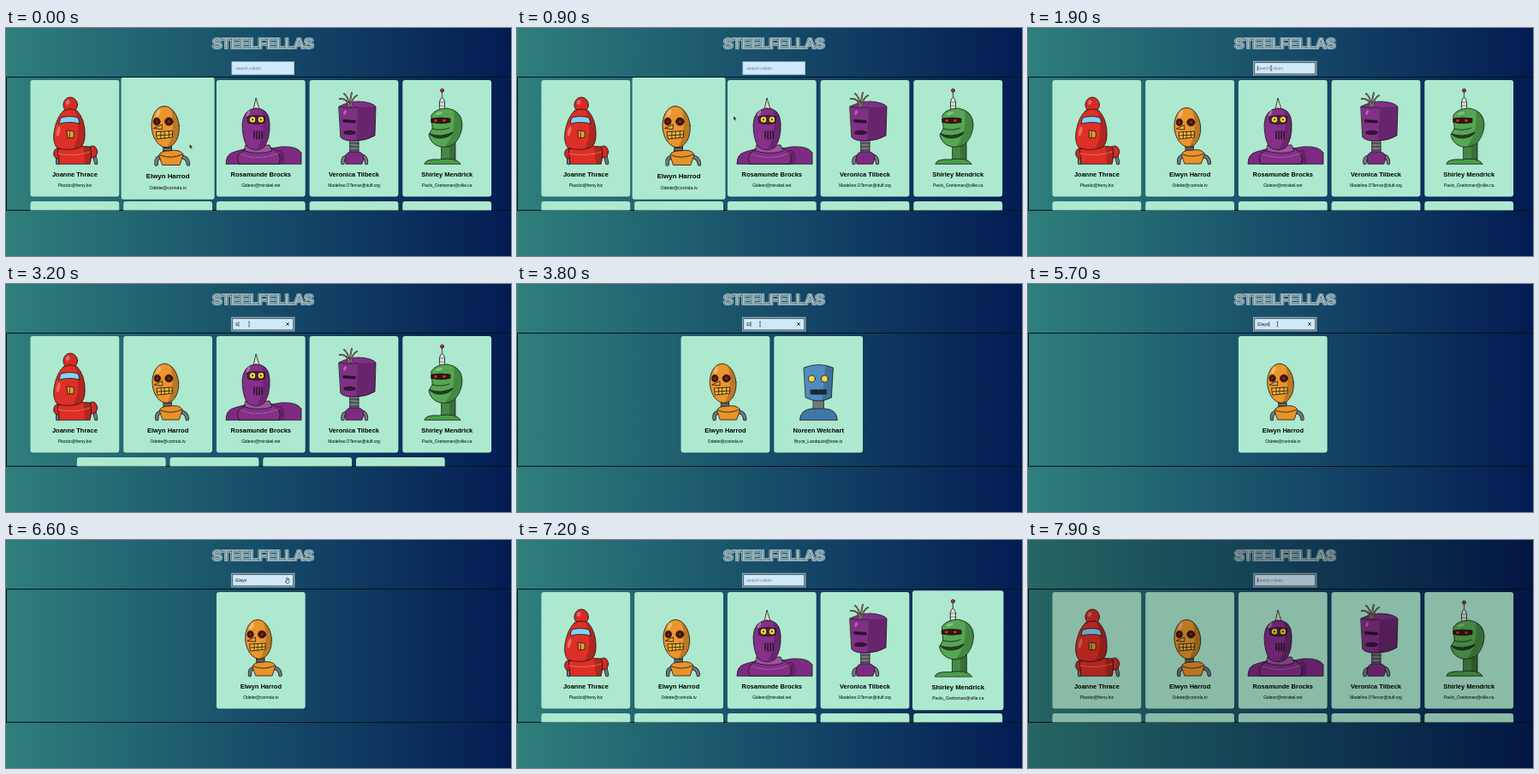
An HTML page for the animation above (8 s loop, 590x267 px).

```html
<!DOCTYPE html>
<html lang="en">
<head>
<meta charset="utf-8">
<title>Robot search</title>
<style>
html, body { margin: 0; width: 100%; height: 100%; overflow: hidden; background: #1a4d67; }
svg { display: block; width: 100vw; height: 100vh; font-family: "Liberation Sans", Arial, sans-serif; }
.name { font-size: 7.5px; font-weight: bold; text-anchor: middle; }
.mail { font-size: 4.95px; text-anchor: middle; }
.title { font-size: 17.4px; font-weight: bold; letter-spacing: -.5px; text-anchor: middle; fill: #b4c6c8; stroke-linejoin: round; }
#query { font-size: 4.9px; }
.art { stroke: #1c1518; stroke-width: .8; stroke-linejoin: round; stroke-linecap: round; }
</style>
</head>
<body>
<svg viewBox="0 0 590 267" preserveAspectRatio="none">
  <defs>
    <linearGradient id="bg">
      <stop offset="0" stop-color="#2f7f7c"/>
      <stop offset=".5" stop-color="#174d69"/>
      <stop offset="1" stop-color="#031c53"/>
    </linearGradient>
    <clipPath id="clip"><rect x="0" y="58" width="590" height="155.5"/></clipPath>
  </defs>
  <rect width="590" height="267" fill="url(#bg)"/>
  <text class="title" x="300" y="24" stroke="#b4c6c8" stroke-width="2.2">STEELFELLAS</text>
  <text class="title" x="300" y="24" stroke="#2b5c70" stroke-width=".6">STEELFELLAS</text>

  <rect x="263.9" y="39.6" width="72.6" height="15" fill="#cfe9fa" stroke="#a9bfc9" stroke-width=".8"/>
  <g id="focus" fill="none">
    <rect x="263.7" y="39.4" width="73" height="15.4" stroke="#98a8ac" stroke-width="1.5"/>
    <rect x="264.7" y="40.4" width="71" height="13.4" stroke="#2b4854" stroke-width=".8"/>
  </g>
  <text id="query" x="268.3" y="48.7"></text>
  <path id="caret" d="M0 44v6" stroke="#111" stroke-width=".6"/>
  <path id="clear" d="M327.3 45.3l3.4 3.4m0-3.4l-3.4 3.4" stroke="#1b3a55" stroke-width="1"/>

  <path d="M590 57.5H.5V213.5H590" fill="none" stroke="#04141c"/>
  <g id="cards" clip-path="url(#clip)"></g>

  <g id="pointer">
    <path id="arrow" d="M0 0V5.2L1.3 4.1 2.2 6 3.1 5.6 2.2 3.8H3.8Z" fill="#111" stroke="#dfeee8" stroke-width=".4"/>
    <path id="beam" d="M-1-2.8H1M0-2.8V2.8M-1 2.8H1" stroke="#222" stroke-width=".6"/>
    <path id="hand" d="M-.5-2.5q.6-.6 1.1 0V-.3L2.4.1V2.2L1.6 3.6H-1L-2.2 1.2-.5 1.6Z" fill="#fff" stroke="#111" stroke-width=".6"/>
  </g>
  <rect id="shade" width="590" height="267" fill="#000"/>
</svg>
<script>
const $ = id => document.getElementById(id);
const LOOP = 8000, PITCH = 108.7, MID = 297.8, CENTER_Y = 129.2, ROW = 142;

const path = (d, fill = 'none', more = '') => `<path d="${d}" fill="${fill}" ${more}/>`;
const oval = (x, y, rx, ry, fill, more = '') =>
  `<ellipse cx="${x}" cy="${y}" rx="${rx}" ry="${ry}" fill="${fill}" ${more}/>`;
const flat = 'stroke="none"';
const shine = (x, y, rx, ry, tilt) =>
  oval(x, y, rx, ry, '#fff', `${flat} opacity=".3" transform="rotate(${tilt} ${x} ${y})"`);
const shadow = d => path(d, '#000', `${flat} opacity=".2"`);
const arm = d => path(d, 'none', 'stroke-width="4.4"') + path(d, 'none', 'stroke="#72797e" stroke-width="3"');

const red = [
  arm('M60 149V158M103 149L105 158'),
  oval(60, 147, 4.5, 6, '#cf2c24'), oval(101, 145, 5.5, 7, '#cf2c24'),
  path('M62 159L60 142Q78 137 98 139Q101 148 98 159Z', '#dd2f26'),
  oval(75, 90, 8.3, 9, '#d42d25'),
  path('M67 97Q76 93 83 97Q92 107 92 124Q92 137 86 140Q72 145 59 140Q54 133 56 121Q59 104 67 97Z', '#df3028'),
  shadow('M80 95Q92 107 92 124Q92 137 86 140L78 142Q89 123 80 95Z'),
  shadow('M90 139L98 139Q101 148 98 159H92Z'),
  path('M64 105Q74 102 84 105L86 112Q74 109 62 112Z', '#7fd3f3'),
  path('M71 120L79 121V128L72 129Z', '#e8a02e'),
  path('M74 122V128'),
  path('M61 147Q79 151 98 145', 'none', 'stroke="#f2b5ac" stroke-dasharray="1 2"'),
  shine(72, 87, 2, 3, 20), shine(61, 121, 1.8, 6, 14)
].join('');

const orange = [
  path('M293 136H302V149H293Z', '#6f777b'),
  path('M293 140H302M293 143H302'),
  arm('M290 150Q284 151 285 158M314 150Q320 151 320.5 158'),
  path('M288 148Q289 143 300 143Q311 141 315 147L311 159H292Z', '#e8922a'),
  path('M289 148Q302 153 314 147'),
  oval(295, 116.3, 15.3, 23, '#ea962c', 'transform="rotate(-5 295 116)"'),
  shadow('M301 95Q311 105 310 121Q308 136 297 139Q307 122 301 95Z'),
  oval(285.5, 110.5, 3.6, 4, '#43150f'), oval(299, 110.5, 4.5, 4.3, '#43150f'),
  oval(285.5, 110.5, 1.2, 1.2, '#a02820', flat), oval(299, 110.5, 1.4, 1.4, '#a02820', flat),
  path('M291 114L282 118L291 119Z', '#f5a843'),
  path('M285 122L303 121V128L286 130Z', '#f0b83a'),
  path('M286 126L303 125M290 122V129M294 122V129M299 121V128'),
  shine(287, 101, 2, 4.5, 25)
].join('');

const violet = [
  path('M257 159Q257 147 267 145L281 141H310L322 139Q340 138 345 146V159Z', '#7d2b82'),
  path('M272 159Q266 147 281 142L309 140Q324 146 319 159Z', '#843089'),
  shadow('M319 159Q322 148 316 143L322 142Q327 150 325 159Z'),
  path('M275 148Q297 156 319 146', 'none', 'stroke="#c98acb" stroke-dasharray="1 2"'),
  path('M280 137H308L311 144Q296 149 279 144Z', '#9d52a1'),
  path('M289 95L292 82L296 95Z', '#d5dadb'),
  path('M292 94Q307 94 308 111Q309 130 301 140Q291 146 282 139Q276 130 276 113Q277 95 292 94Z', '#85308a'),
  shadow('M299 95Q308 101 308 114Q308 132 300 140L293 142Q304 122 299 95Z'),
  path('M282 104Q292 101 303 104L302 111Q292 114 283 111Z', '#4a1c50'),
  oval(288, 107.3, 3.8, 3.8, '#f4d531'), oval(297.8, 107.3, 3.8, 3.8, '#f4d531'),
  oval(288, 107.3, 1, 1, '#111', flat), oval(297.8, 107.3, 1, 1, '#111', flat),
  path('M290 121V129M293 121V130M296 121V130M299 121V129', 'none', 'stroke-width="1.4"'),
  shine(283, 100, 1.5, 4, 28)
].join('');

const strands = 'M401 92Q398 82 390 83M401 92Q400 80 395 77M402 92Q402 82 404 76M403 92Q404 82 410 79';
const box = [
  path('M402 128H412V148H402Z', '#747a80'),
  path('M402 135H412M402 139H412M402 143H412'),
  arm('M397 151Q393 152 393.5 158M417 150Q421 152 421 158'),
  path('M397 159Q394 147 402 145H412Q421 147 416 159Z', '#7d2b82'),
  path('M389 92Q400 86 413 86Q428 87 432 92L431 126Q421 132 409 132Q395 133 391 128Z', '#803086'),
  shadow('M411 93L432 92L431 126Q421 132 409 132Z'),
  path('M389 92Q400 95 411 93', 'none', 'stroke-width=".6"'),
  path(strands, 'none', 'stroke-width="1.9"'),
  path(strands, 'none', 'stroke="#a88f88" stroke-width=".9"'),
  path('M394 107.5L408 108.5V111L394 110Z', '#2b0d2d'),
  oval(401.5, 122.5, 7, 2.2, '#3b123d'),
  shine(396, 99, 1.5, 3, 25)
].join('');

const green = [
  path('M509.5 74V96', 'none', 'stroke="#555" stroke-width="1.2"'),
  oval(509.5, 73.2, 2, 2, '#c92c3b'),
  path('M507 96Q505 84 509.5 81Q514 84 512 96Z', '#dfe5df'),
  path('M506 87H513M506 91H513', 'none', 'stroke-width=".5"'),
  path('M509 132H525V155H509Z', '#458a44'),
  shadow('M518 132H525V155H518Z'),
  path('M489 159Q490 153 506 154Q526 151 531 159Z', '#4aa04a'),
  path('M497 102Q502 94 516 94Q532 97 533 112Q533 124 526 133Q519 141 507 139Q496 136 494 125L498 118Z', '#55a752'),
  shadow('M523 96Q533 101 533 114Q531 130 518 139L513 139Q526 122 523 96Z'),
  path('M497 106Q508 104 519 106V110.5Q508 113 497 110.5Z', '#351512'),
  oval(502, 108.4, 1.8, 1.4, '#d33a26', flat), oval(512, 108.4, 1.8, 1.4, '#d33a26', flat),
  path('M498 118Q508 121 518 117'),
  path('M495 124Q508 129 522 122Q519 128 508 129Q499 129 495 124Z', '#26421f'),
  shine(506, 100, 4, 1.6, -14)
].join('');

const blue = [
  path('M292 134H304V150H292Z', '#71787c'),
  path('M276 159Q277 147 290 146H306Q319 147 320 159Z', '#3f78a8'),
  path('M281 98Q298 91 315 98L313 133Q298 141 283 133Z', '#4f8dc0'),
  shadow('M306 95L315 98L313 133L302 137Z'),
  oval(290, 111, 4, 4, '#f0d64b'), oval(305, 111, 4, 4, '#f0d64b'),
  path('M289 124H307V129H289ZM295 124V129M301 124V129', '#1d2b3a')
].join('');

const people = [
  ['Joanne Thrace', 'Placido@ferny.biz', red, 80.2],
  ['Elwyn Harrod', 'Odette@corinda.tv', orange, MID],
  ['Rosamunde Brocks', 'Gideon@mirabel.net', violet, MID],
  ['Veronica Tilbeck', 'Madeline.OTerran@dulf.org', box, 406.5],
  ['Shirley Mendrick', 'Pavlo_Grettsman@ollie.ca', green, 515.2],
  ['Mrs. Denise Strand', '', '', 0],
  ['Rufus Weimark', '', '', 0],
  ['Ambrosius Hjalmar V', '', '', 0],
  ['Noreen Welchart', 'Bryce_Landquist@tove.io', blue, MID],
  ['Emmentina DuRoche', '', '', 0]
];

$('cards').innerHTML = people.map(([name, mail, art, x]) => `<g>
  <rect x="-51.2" y="61.8" width="103.8" height="136.6" rx="3" opacity=".15"/>
  <rect x="-51.9" y="61" width="103.8" height="136.4" rx="3" fill="#ace9cf"/>
  <g class="art" transform="translate(${-x} 0)">${art}</g>
  <text class="name" y="174">${name}</text>
  <text class="mail" y="186">${mail}</text></g>`).join('');
const cards = [...$('cards').children];

// [time, text] and [card, enter, leave]
const typing = [[0, ''], [3100, 'E'], [3600, 'El'], [4000, 'Elw'], [4300, 'Elwy'], [4650, 'Elwyn'], [6690, '']];
const hovers = [[1, -1000, 900], [2, 900, 1300], [4, 6940, 7130]];
const FOCUS = 1800;
// [time, x, y]
const moves = [[0, 214.5, 136], [300, 214.5, 136], [900, 253, 103], [1600, 284, 47], [5600, 284, 47],
  [6200, 328.5, 47], [6750, 328.5, 47], [7000, 500, 100], [7180, 600, 70]];

const clamp = v => Math.min(1, Math.max(0, v));
const show = (id, on) => $(id).setAttribute('visibility', on ? 'visible' : 'hidden');
const easeOut = v => 1 - (1 - clamp(v)) ** 2;

function grow(card, t) {
  const h = hovers.find(h => h[0] === card);
  return h ? 1 + .05 * (easeOut((t - h[1]) / 250) - easeOut((t - h[2]) / 250)) : 1;
}

function pointerAt(t) {
  const i = moves.findIndex(m => m[0] > t);
  if (i < 0) return [600, 70];
  const [a, b] = [moves[i - 1], moves[i]];
  const k = (t - a[0]) / (b[0] - a[0]);
  return [a[1] + (b[1] - a[1]) * k, a[2] + (b[2] - a[2]) * k];
}

function drawCards(t, query) {
  const found = people.map((p, i) => i).filter(i => people[i][0].toLowerCase().includes(query.toLowerCase()));
  cards.forEach((card, i) => {
    const place = found.indexOf(i);
    card.style.display = place < 0 ? 'none' : '';
    if (place < 0) return;
    const row = Math.floor(place / 5), count = Math.min(5, found.length - row * 5);
    const x = MID + (place % 5 - (count - 1) / 2) * PITCH;
    card.setAttribute('transform',
      `translate(${x} ${CENTER_Y + row * ROW}) scale(${grow(i, t)}) translate(0 ${-CENTER_Y})`);
  });
}

function drawInput(t, since, query) {
  const field = $('query');
  field.textContent = query || 'search robots';
  field.setAttribute('fill', query ? '#111' : '#75818a');
  const focused = t >= FOCUS;
  const blink = Math.floor((t - Math.max(since, FOCUS)) / 500) % 2 === 0;
  show('focus', focused);
  show('clear', query);
  show('caret', focused && blink);
  const end = 268.3 + (query ? field.getComputedTextLength() + .4 : 0);
  $('caret').setAttribute('transform', `translate(${end} 0)`);
}

function drawPointer(t, query) {
  const [x, y] = pointerAt(t);
  const inside = x > 263 && x < 337 && y > 39 && y < 55;
  const onClear = inside && query && x > 325;
  show('arrow', !inside);
  show('beam', inside && !onClear);
  show('hand', onClear);
  $('pointer').setAttribute('transform', `translate(${x} ${y})`);
}

function frame(now) {
  const t = now % LOOP;
  const [since, query] = typing.filter(k => k[0] <= t).pop();
  drawCards(t, query);
  drawInput(t, since, query);
  drawPointer(t, query);
  $('shade').setAttribute('opacity', clamp((t - 7700) / 1000));
  requestAnimationFrame(frame);
}
frame(0);
</script>
</body>
</html>
```
